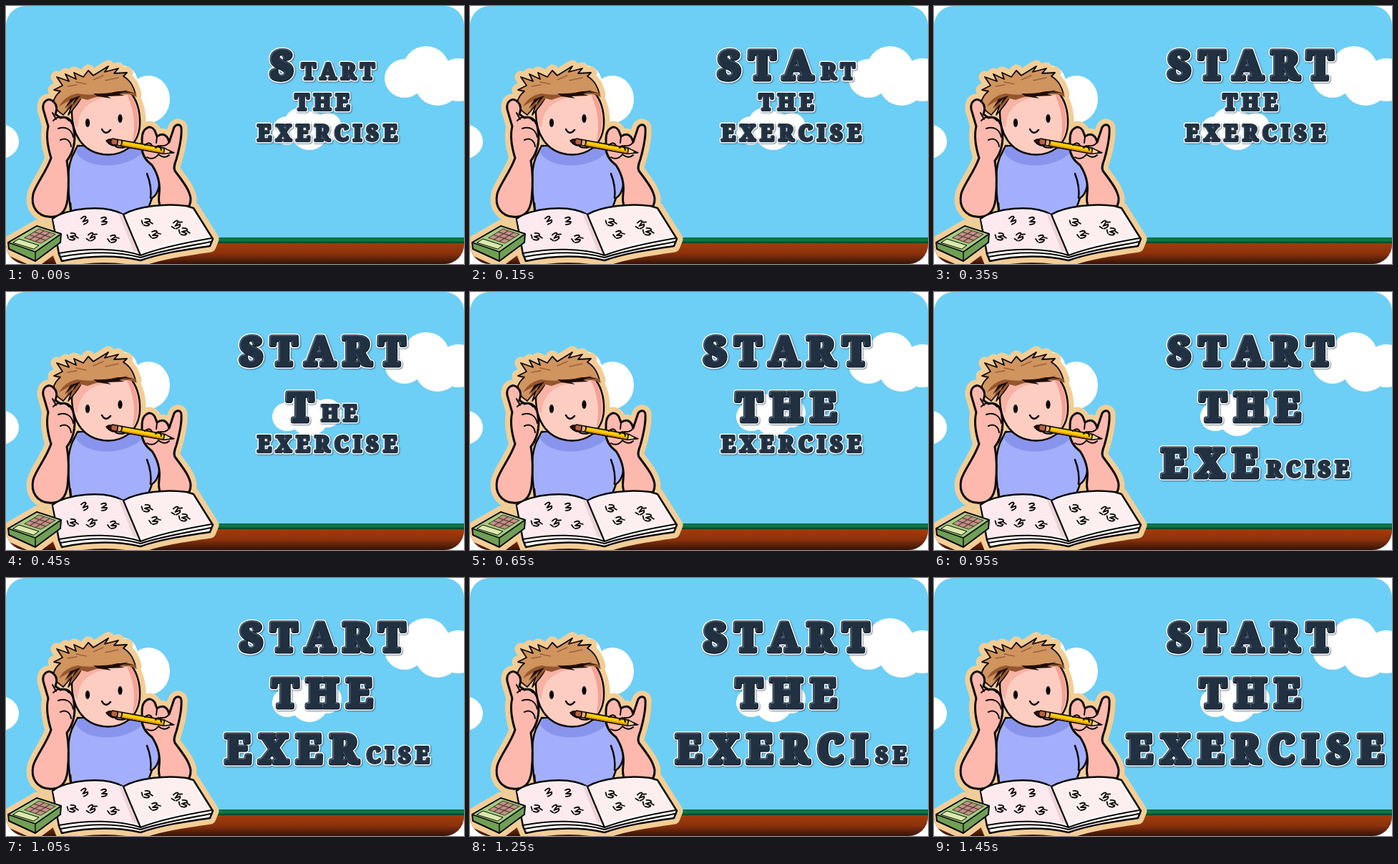
These frames come from a looping animation (640 by 360 pixels, 3450 ms). An HTML page with a canvas:

```html
<!DOCTYPE html>
<html lang="en">
<head>
<meta charset="utf-8">
<title>Start the exercise</title>
<style>
html, body { margin: 0; width: 100%; height: 100%; overflow: hidden; background: #fff; }
canvas { display: block; width: 100vw; height: 100vh; }
</style>
</head>
<body>
<canvas id="stage" width="640" height="360"></canvas>
<script>
const W = 640, H = 360, LOOP = 3450, STEP = 100;
const WORDS = ['START', 'THE', 'EXERCISE'];
const CENTERS = [442, 442, 449];
const LETTERS = WORDS.join('').length;
const BIG = 55, SMALL = 30, SPACING = 0.21;

const stage = document.getElementById('stage').getContext('2d');
const backdrop = document.createElement('canvas');
backdrop.width = W;
backdrop.height = H;
const g = backdrop.getContext('2d');

function fill(d, color) {
  g.fillStyle = color;
  g.fill(new Path2D(d));
}

function line(d, width = 2.5, color = '#0b0706') {
  g.strokeStyle = color;
  g.lineWidth = width;
  g.stroke(new Path2D(d));
}

function shape(d, color, width) {
  fill(d, color);
  line(d, width);
}

function oval(x, y, rx, ry, color) {
  g.fillStyle = color;
  g.beginPath();
  g.ellipse(x, y, rx, ry, 0, 0, Math.PI * 2);
  g.fill();
}

function band(y, height, ...colors) {
  const shade = g.createLinearGradient(0, y, 0, y + height);
  colors.forEach((c, i) => shade.addColorStop(i / (colors.length - 1), c));
  g.fillStyle = shade;
  g.fillRect(0, y, W, height);
}

const BODY = {
  shirt: 'M100 195 L96 203 C84 222 86 250 90 284 L100 294 L196 290 L204 268 C214 262 216 246 214 232 C210 218 204 210 192 200Z',
  face: 'M92 148 C92 178 106 203 136 207 C164 210 185 194 187 166 C188 146 182 128 172 119 L112 121 C102 128 94 136 92 148Z',
  hair: 'M80 152 C72 147 67 142 66 134 C68 127 72 122 76 119 L67 117 L79 111 L71 99 L88 105 L83 95 L98 102 L95 93 L108 99 L115 90 L122 97 L143 84 L138 92 L157 87 L151 94 L169 93 L164 98 C174 104 178 112 181 123 C170 118 158 119 146 122 C130 126 116 126 106 126 C102 136 92 146 87 152 L92 138Z',
  leftArm: 'M67 134 C60 126 50 133 52 144 L59 168 C56 180 58 196 63 212 C56 232 42 248 38 262 C34 280 44 293 60 294 C76 296 84 286 86 270 C88 250 88 232 85 216 C93 206 98 190 95 174 C94 160 86 153 76 156 L69 151 C72 143 71 138 67 134Z',
  rightArm: 'M190 186 C190 170 202 164 208 174 L211 182 C220 176 226 181 228 190 L234 172 C236 164 244 164 245 170 C246 184 242 200 238 214 C235 222 234 226 236 230 C248 246 256 256 258 268 C259 284 244 292 230 290 C216 288 212 276 214 262 C216 246 212 234 204 222 C196 216 190 208 190 198Z',
  book: 'M65 297 C84 282 138 276 164 291 C184 279 226 275 252 279 L262 282 L289 325 L285 335 C250 340 216 345 188 355 C152 347 112 349 78 356 L74 346Z',
  calculator: 'M3 330 L43 307 L77 318 L76 330 L41 356 L4 339Z'
};

function drawScenery() {
  g.beginPath();
  g.roundRect(0, 0, W, H, 27);
  g.clip();
  g.fillStyle = '#6dcff6';
  g.fillRect(0, 0, W, H);
  const puffs = [
    [557, 101, 28, 27], [587, 89, 33, 33], [603, 107, 32, 32], [632, 103, 30, 30],
    [162, 107, 22, 24], [199, 130, 30, 33],
    [393, 174, 21, 20], [411, 164, 22, 22], [424, 174, 27, 27], [449, 169, 20, 20],
    [-8, 189, 26, 24]
  ];
  for (const [x, y, rx, ry] of puffs) oval(x, y, rx, ry, '#fff');
  band(323, 8, '#07683f', '#0a7d4c', '#05371f');
  band(331, 29, '#a33c0c', '#8b320c', '#351308');
}

function drawChild() {
  for (const d of Object.values(BODY)) line(d, 17, '#f3cd96');

  shape(BODY.shirt, '#a3affc');
  fill('M97 203 C112 230 170 228 192 203 L184 199 L104 196Z', '#8994ec');
  line('M197 234 Q204 252 202 268 M90 275 L91 286');

  shape(BODY.face, '#fdcdc1');
  fill('M173 122 C187 140 189 172 176 191 C182 168 179 144 169 124Z', '#f6a193');
  fill('M94 148 C96 137 106 127 120 127 L144 127 C116 131 101 144 100 170 C95 165 93 158 94 148Z', '#f8b3a5');

  shape(BODY.hair, '#d0945f', 1.8);
  fill('M100 122 C122 127 148 119 181 121 L183 127 L172 123 L151 124 L126 127 L114 131 L105 129 L91 145 L97 130 L83 148 L90 131 L74 140 C80 130 88 124 100 122Z', '#95562f');
  fill('M122 122 Q148 123 171 117 L158 123 L166 125 L142 126 L147 129 L128 126Z M104 125 L91 141 L97 129 L82 143 L90 130Z', '#1f0d06');
  line('M86 112 L99 110 M98 106 L112 109 M122 103 L136 97 M139 104 L157 100', 1.4, '#9b6238');

  oval(114, 163, 3.1, 6, '#080505');
  oval(159.5, 157, 3.1, 6, '#080505');
  line('M134 172 Q139 181 146 173');
  shape('M140 188 Q145 184 151 187 L154 195 Q146 196 140 188Z', '#381010', 1.5);
  line('M153 196 Q160 199 166 197', 2);

  shape(BODY.leftArm, '#fdb9ad', 3);
  line('M66 160 C72 153 82 153 88 160 M73 171 C84 167 92 173 94 183 M76 187 C84 183 90 188 91 196 M65 149 L70 158', 2);

  shape(BODY.rightArm, '#fdb9ad', 3);
  line('M211 182 L210 191 M228 190 Q224 196 216 195 M197 211 Q206 216 213 207 Q222 214 228 208', 2);
  drawPencil();
}

function drawPencil() {
  g.save();
  g.translate(148, 189);
  g.rotate(0.18);
  shape('M0 -4 H8 V4 H0 Q-3 0 0 -4Z', '#ba6042', 1.5);
  shape('M8 -4 H14 V4 H8Z', '#e8b16b', 1.5);
  shape('M14 -4 H74 V4 H14Z', '#ffcb08', 1.8);
  line('M15 2 H74', 1.5, '#d38c0a');
  shape('M74 -4 L88 0 L74 4Z', '#f3cf9f', 1.5);
  fill('M82 -2 L90 0 L82 2Z', '#111');
  g.restore();
  line('M194 194 Q201 188 204 195 M209 198 Q215 191 217 201', 2);
}

function drawBook() {
  shape(BODY.book, '#fff', 2.5);
  fill('M66 298 C88 284 137 279 163 292 L188 344 C150 335 110 339 76 345Z', '#fceaee');
  fill('M165 292 C188 280 226 277 257 282 L286 323 C248 327 216 333 190 344Z', '#fdeff0');
  fill('M157 289 L164 291 L188 344 L178 341 Z', '#edd2d7');
  line('M164 291 L188 348 M74 345 C112 338 156 337 188 348 C216 337 252 330 287 324 M76 350 C114 343 152 341 188 351 C218 341 256 335 286 329', 2.2);
  const marks = [
    [110, 299], [137, 300], [93, 322], [120, 322], [150, 325],
    [197, 302], [239, 305], [208, 319], [249, 315]
  ];
  marks.forEach(([x, y], i) => {
    g.save();
    g.translate(x, y);
    g.rotate((i % 3 - 1) * 0.35);
    line('M-4 -4 Q3 -7 3 -3 L-3 1 L4 1 Q4 5 -3 5', 1.9);
    if (i > 1) line('M-8 0 L-5 4 M4 -2 L8 -1', 1.8);
    g.restore();
  });
}

function drawCalculator() {
  shape(BODY.calculator, '#6f9f55', 2);
  shape('M3 330 L43 307 L77 318 L41 343Z', '#a4cf80', 1.6);
  line('M41 343 V355', 1.5);
  shape('M10 330 L18 325 L46 334 L39 339Z', '#d9e9ad', 1);
  g.save();
  g.transform(0.9, 0.3, -0.84, 0.52, 46, 311);
  for (let row = 0; row < 3; row++) {
    for (let col = 0; col < 3; col++) {
      g.fillStyle = '#c58f87';
      g.fillRect(col * 8.5, row * 8, 8.5, 8);
      line(`M${col * 8.5} ${row * 8} h8.5 v8 h-8.5Z`, 1.2, '#40372a');
    }
  }
  g.restore();
}

function drawLetter(ch, x, y, size) {
  const k = size / BIG, fat = 7 * k;
  const layer = (color, width, shift) => {
    stage.strokeStyle = stage.fillStyle = color;
    stage.lineWidth = width;
    stage.strokeText(ch, x + shift, y + shift);
    stage.fillText(ch, x + shift, y + shift);
  };
  stage.shadowColor = 'rgba(30,60,85,.6)';
  stage.shadowBlur = 2;
  stage.shadowOffsetX = stage.shadowOffsetY = 1;
  layer('#fff', fat + 3, 0);
  stage.shadowColor = 'transparent';
  layer('#14202d', fat, 0);
  layer('#4d6074', fat - 2.6 * k, -0.6 * k);
  layer('#223141', fat - 3.6 * k, 0.4 * k);
}

function drawWord(word, big, center, y) {
  const glyphs = [...word].map((ch, i) => {
    const size = i < big ? BIG : SMALL;
    const font = `900 ${size}px "Noto Serif", "DejaVu Serif", serif`;
    stage.font = font;
    return { ch, size, font, width: stage.measureText(ch).width + size * SPACING };
  });
  const total = glyphs.reduce((sum, it) => sum + it.width, 0);
  let x = center - (total - glyphs.at(-1).size * SPACING) / 2;
  for (const it of glyphs) {
    stage.font = it.font;
    drawLetter(it.ch, x, y, it.size);
    x += it.width;
  }
}

function drawTitle(count) {
  let y = 24;
  WORDS.forEach((word, i) => {
    const big = Math.max(0, Math.min(count, word.length));
    y += big ? 78 : 43;
    drawWord(word, big, CENTERS[i], y);
    count -= word.length;
  });
}

g.lineJoin = g.lineCap = stage.lineJoin = 'round';
drawScenery();
drawChild();
drawBook();
drawCalculator();

const start = performance.now();
let shown = 0;

function tick() {
  const t = (performance.now() - start) % LOOP;
  const count = Math.min(LETTERS, 1 + Math.floor((t + STEP / 2) / STEP));
  if (count !== shown) {
    shown = count;
    stage.clearRect(0, 0, W, H);
    stage.drawImage(backdrop, 0, 0);
    drawTitle(count);
  }
  requestAnimationFrame(tick);
}
tick();
</script>
</body>
</html>
```
